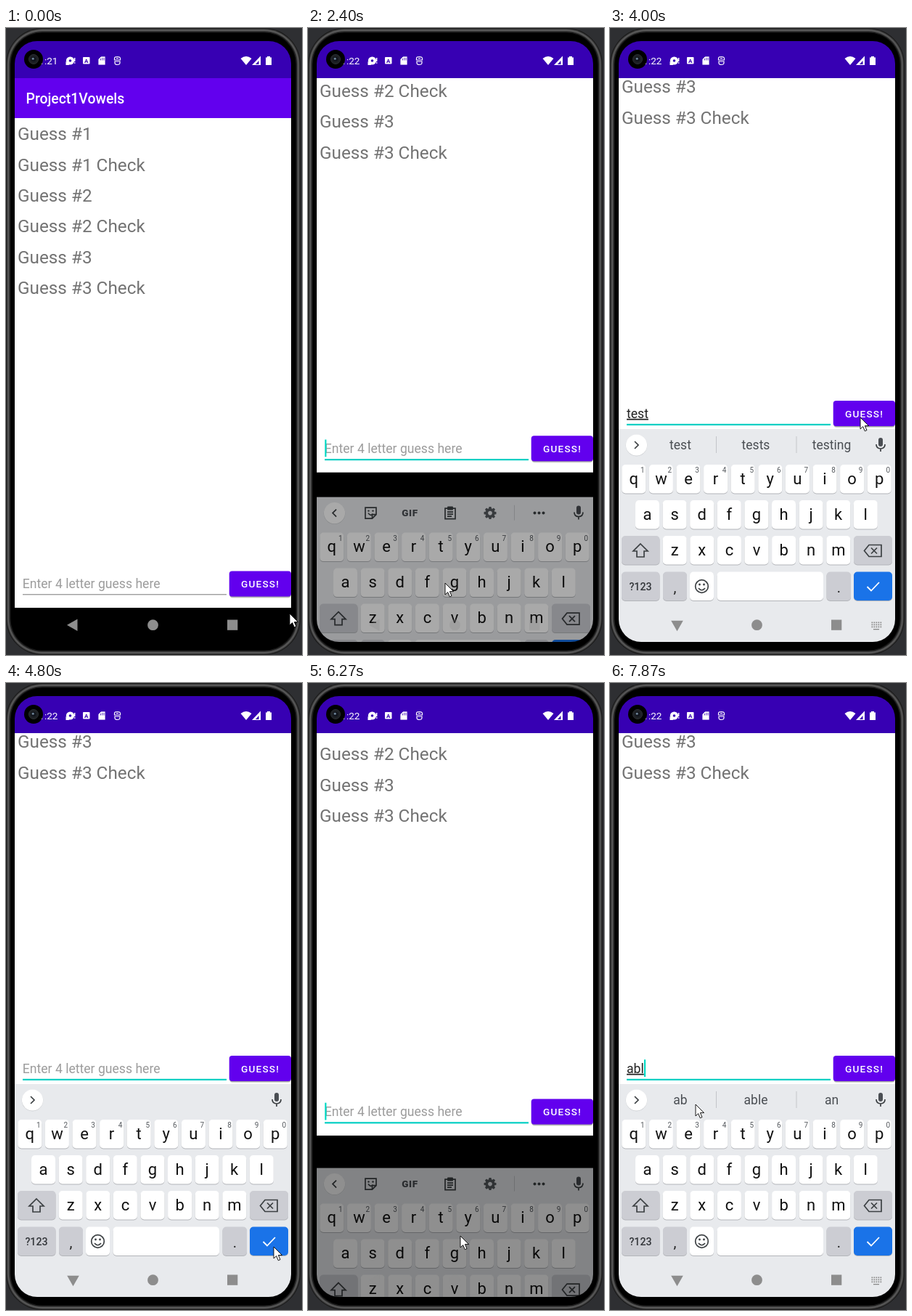
An HTML page for the animation above (8000 ms loop, 408 by 863 pixels).

```html
<!DOCTYPE html>
<html lang="en">
<head>
<meta charset="utf-8">
<title>Word guess app</title>
<style>
html, body { margin: 0; width: 100%; height: 100%; overflow: hidden; background: #17181a; }
svg { display: block; font-family: Roboto, sans-serif; }
text { white-space: pre; }
.mid { text-anchor: middle; }
.end { text-anchor: end; }
.line { fill: none; stroke: #3c4043; stroke-width: 1.7; }
</style>
</head>
<body>
<svg id="stage" width="408" height="863" viewBox="0 0 408 863"></svg>
<script>
const LOOP = 8000, PAN = 234.5, KEYBOARD = 293;
const stage = document.getElementById('stage');

const rect = (x, y, w, h, fill, r = 0, extra = '') =>
  `<rect x="${x}" y="${y}" width="${w}" height="${h}" rx="${r}" fill="${fill}" ${extra}/>`;
const circle = (x, y, r, fill, extra = '') => `<circle cx="${x}" cy="${y}" r="${r}" fill="${fill}" ${extra}/>`;
const text = (x, y, size, fill, body, extra = '') =>
  `<text x="${x}" y="${y}" font-size="${size}" fill="${fill}" ${extra}>${body}</text>`;
const path = (d, extra = 'fill="#3c4043"') => `<path d="${d}" ${extra}/>`;
const at = (x, y, body) => `<g transform="translate(${x} ${y})">${body}</g>`;
const LINE = 'class="line"';

// Nested rounded shells give the rim its soft highlight
function device() {
  const shells = ['#1b1b1b', '#444', '#5c5c5c', '#3a3a3a', '#171717', '#000'];
  return rect(0, 0, 408, 863, '#2e2f32') + shells.map((fill, i) => {
    const inset = i * 1.3;
    return rect(inset, inset, 406 - 2 * inset, 863 - 2 * inset, fill, 50 - inset);
  }).join('');
}

function statusBar() {
  const gear = circle(0, 0, 5.6, '#fff') + circle(0, 0, 1.8, '#3700b3') +
    path('M-6 6V1L-1 6Z', 'fill="#fff"') + rect(5.5, -4, 1.4, 5, '#fff') + rect(5.5, 2.2, 1.4, 1.6, '#fff');
  const bug = path('M-4 -1V-3Q-4 -5.5 0 -5.5T4 -3V-1ZM-3.5 1H3.5V3Q3.5 5.5 0 5.5T-3.5 3Z',
    'fill="none" stroke="#fff" stroke-width="1.2"') + rect(-1.5, -4, 3, 1.2, '#fff');
  return rect(12, 18, 381, 51, '#3700b3') +
    text(71.5, 50, 13.6, '#fff', '', 'id="clock" class="end"') +
    at(88.5, 45, gear) +
    rect(106, 40, 9.5, 9.5, '#fff', 1) + text(110.7, 48, 8, '#3700b3', 'A', 'class="mid" font-weight="700"') +
    path('M131 39H137V51H127V43ZM130.5 42V44.5M132.8 41V44.5M135 41V44.5',
      'fill="#fff" stroke="#3700b3" stroke-width=".8"') +
    at(153.5, 45, bug) +
    path('M323.5 42Q331 36 338.5 42L331 51Z', 'fill="#fff"') +
    path('M351 38.5V51H339Z', 'fill="#fff"') + path('M348.5 45V50H344Z', 'fill="#3700b3"') +
    path('M358 40.5H360V39H364V40.5H366V51H358Z', 'fill="#fff"') +
    circle(38, 43, 13, '#000') + circle(38, 43, 6.5, '#1d2024', 'stroke="#2c3034"') +
    circle(38, 43, 3.2, '#10141c') + circle(37.2, 42.2, 1.5, '#71879b');
}

function app() {
  const rows = [1, 2, 3].flatMap(n => [`Guess #${n}`, `Guess #${n} Check`]);
  const rowY = i => 154.2 + i * 42.4;
  return rect(12, 69, 381, 729, '#fff') +
    rect(12, 69, 381, 55, '#6200ee') +
    text(27.5, 104.3, 19.4, '#fff', 'Project1Vowels', 'font-weight="500"') +
    rows.map((row, i) => text(16, rowY(i), 24.3, '#737373', row)).join('') +
    `<g id="answer">${['TEST', 'XXXX'].map((word, i) =>
      text(388.5, rowY(i), 24.3, '#737373', word, 'class="end"')).join('')}</g>` +
    text(22.8, 771.3, 17.6, '#9c9c9c', 'Enter 4 letter guess here', 'id="hint"') +
    text(23, 771.3, 17.6, '#212121', '', 'id="typed"') +
    rect(23, 779.3, 281, 1, '#777', 0, 'id="underline"') +
    rect(23.2, 752.8, 2.2, 23.8, '#03dac5', 0, 'id="caret"') +
    rect(308.5, 749.5, 84, 35, '#000', 4, 'opacity=".18"') +
    rect(308, 748.5, 85, 35, '#000', 4, 'opacity=".22"') +
    rect(307.7, 747.5, 85.3, 35, '#6200ee', 4) +
    rect(307.7, 747.5, 85.3, 35, '#fff', 4, 'id="ripple"') +
    text(324, 770.4, 13.6, '#fff', 'GUESS!', 'font-weight="500" letter-spacing="1.21"');
}

function key(x, y, w, fill, body = '') {
  return rect(x, y + 1, w, 39.5, '#b3b5b9', 5) + rect(x, y, w, 39.5, fill, 5) + body;
}

function letters(word, left, y, digits) {
  return [...word].map((letter, i) => {
    const x = left + i * 37.6;
    return key(x, y, 33, '#fff', text(x + 16.5, y + 26.5, 22, '#111', letter, 'class="mid"') +
      (digits ? text(x + 28.5, y + 11, 10, '#55595e', (i + 1) % 10, 'class="mid"') : ''));
  }).join('');
}

function toolIcons() {
  const teeth = Array.from({ length: 8 }, (_, i) =>
    rect(-1.8, -8.5, 3.6, 4, '#55595e', 1, `transform="rotate(${i * 45})"`)).join('');
  return at(86.5, 574, path('M-7.5 -7.5H7.5V2L2 7.5H-7.5ZM7.5 2H2V7.5M-3.5 0Q0 5 3 1', LINE) +
      circle(-3, -3, 1.2, '#3c4043') + circle(3, -3, 1.2, '#3c4043')) +
    text(140.5, 578.6, 13.5, '#4a4e53', 'GIF', 'class="mid" font-weight="900" letter-spacing=".6"') +
    at(196, 574, path('M-7 -6.5H7V8H-7ZM-4 -1.5H4M-4 1.5H4M-4 4.5H2', LINE) + rect(-4, -9, 8, 5, '#3c4043', 1)) +
    at(251, 574, teeth + circle(0, 0, 4.7, 'none', 'stroke="#55595e" stroke-width="3.6"')) +
    rect(284, 563, 1, 21, '#c6c8cc') +
    [312.5, 318.5, 324.5].map(x => circle(x, 574, 2, '#3c4043')).join('');
}

function keyboard() {
  const shift = path('M42 710L52 720H47V728H37V720H32Z', LINE);
  const erase = path('M357 711.5H374V727.5H357L350.5 719.5ZM360 715.5L368 723.5M368 715.5L360 723.5', LINE);
  const smile = circle(126.5, 768.5, 8.8, 'none', LINE) + circle(123.5, 766, 1.4, '#3c4043') +
    circle(129.5, 766, 1.4, '#3c4043') + path('M122 771Q126.5 776.5 131 771', LINE);
  const grey = '#cccdd3';
  return rect(12, 552, 381, 400, '#e8eaed') +
    circle(36.5, 574.6, 14.8, '#cfd1d4') + circle(36.5, 574, 14.6, '#fff') +
    path('M2.5 -5L-2.5 0L2.5 5', `id="chevron" ${LINE}`) +
    `<g id="tools">${toolIcons()}</g>` +
    `<g id="words">${[97, 201, 305.5].map(x => text(x, 580.4, 17.5, '#4a4e53', '', 'class="mid"')).join('')}` +
    rect(146, 562, 1, 23, '#c3c5c9') + rect(256.5, 562, 1, 23, '#c3c5c9') + '</g>' +
    at(373, 573, rect(-3, -9, 6, 12, '#4a4e53', 3) + path('M-6 0Q-6 6 0 6T6 0M0 6V10', LINE)) +
    letters('qwertyuiop', 16.3, 601, true) +
    letters('asdfghjkl', 35, 650) +
    letters('zxcvbnm', 72.7, 699) +
    key(16, 699, 52.5, grey, shift) + key(336, 699, 53, grey, erase) +
    key(16, 748.5, 52.5, grey, text(42, 774, 14.2, '#33363a', '?123', 'class="mid" font-weight="500"')) +
    key(73, 748.5, 33, grey, text(89.5, 777, 20, '#222', ',', 'class="mid"')) +
    key(110, 748.5, 33, '#fff', smile) +
    key(147.5, 748.5, 146.5, '#fff') +
    key(298.5, 748.5, 33.5, grey, text(315.5, 777, 20, '#222', '.', 'class="mid"')) +
    key(336, 748.5, 53, '#1a73e8', path('M354.5 769L360 774.5L371 763', 'fill="none" stroke="#fff" stroke-width="1.8"'));
}

function navBar() {
  const dots = Array.from({ length: 15 }, (_, i) =>
    rect(360.5 + i % 5 * 3, 817.5 + Math.floor(i / 5) * 3, 1.7, 1.7, '#888')).join('');
  return '<g id="nav" fill="#8d8d8d">' + path('M-8.5 0L6 -8.3V8.3Z', 'id="back"') +
    circle(202.5, 821.7, 7.4, 'inherit') + rect(305, 814.5, 14.3, 14.3, 'inherit') + '</g>' +
    `<g id="switcher">${dots}${rect(363, 827, 8, 1.3, '#888')}</g>`;
}

stage.innerHTML = `<defs>
  <clipPath id="screen"><rect x="12" y="18" width="381" height="827" rx="31"/></clipPath>
  <clipPath id="window"><rect x="12" y="69" width="381" height="729"/></clipPath></defs>` +
  device() +
  `<g clip-path="url(#screen)"><g clip-path="url(#window)"><g id="app">${app()}</g></g>
   <g id="keyboard">${keyboard()}</g>${navBar()}${statusBar()}</g>` +
  path('M0 0V16L3.7 12.6L6.3 18.8L9 17.6L6.4 11.6H11.6Z', 'id="pointer" fill="#fff" stroke="#000" stroke-width=".9"');

const el = {};
stage.querySelectorAll('[id]').forEach(node => el[node.id] = node);
const suggestions = el.words.querySelectorAll('text');

// time, typed text, suggestions (null shows the tool icons)
const typing = [
  [0, '', null], [3000, 't', null], [3070, 't', ['t', 'the', 'to']], [3130, 'te', ['te', 'the', 'ten']],
  [3270, 'tes', ['tes', 'test', 'yes']], [3400, 'test', ['test', 'tests', 'testing']],
  [4270, '', []], [5120, '', null],
  [7670, 'a', null], [7730, 'a', ['a', 'an', 'and']], [7800, 'ab', ['ab', 'able', 'an']],
  [7870, 'abl', ['ab', 'able', 'an']],
];
const caretOn = [[2130, 2630], [3000, 3930], [4270, 4730], [4970, 5470], [5970, 6470], [6970, 7470], [7670, 8100]];
const pointer = [
  [270, 391, 806], [1070, 305, 846], [1130, 305, 846], [1740, 184, 766], [1800, 189, 764],
  [2530, 189, 764], [2930, 331, 546], [3000, 331, 546], [3200, 345, 536], [4330, 345, 536],
  [4660, 366, 790], [4730, 369, 776], [5200, 369, 776], [5270, 306, 759], [5600, 285, 808],
  [5950, 210, 761], [6450, 210, 761], [6900, 108, 595], [7130, 108, 595], [7195, 118, 580], [LOOP, 118, 580],
];

const ramp = (t, start, length) => Math.min(1, Math.max(0, (t - start) / length));
const smooth = u => u * u * (3 - 2 * u);
const decelerate = u => 1 - (1 - u) ** 3;
const show = (node, on) => node.setAttribute('visibility', on ? 'inherit' : 'hidden');
const move = (node, x, y, more = '') => node.setAttribute('transform', `translate(${x} ${y}) ${more}`);

// Cubic bezier easing (.2, 0, 0, 1), solved by bisection
function emphasized(x) {
  let low = 0, high = 1;
  for (let i = 0; i < 20; i++) {
    const s = (low + high) / 2;
    if (.6 * (1 - s) ** 2 * s + s ** 3 < x) low = s; else high = s;
  }
  return smooth(low);
}

function pointerAt(t) {
  const i = pointer.findIndex(p => p[0] > t);
  if (i <= 0) return pointer[i ? pointer.length - 1 : 0].slice(1);
  const [from, to] = [pointer[i - 1], pointer[i]];
  const u = smooth(ramp(t, from[0], to[0] - from[0]));
  return [1, 2].map(k => from[k] + (to[k] - from[k]) * u);
}

function render(t) {
  const opening = t < 4840 ? 2317 : 6200;
  const closing = t >= 4840 && t < 6000;
  const raw = closing ? 1 - ramp(t, 4840, 220) : ramp(t, opening, 285);
  const rise = closing ? 1 - emphasized(1 - raw) : emphasized(raw);
  const pan = closing ? 1 - decelerate(ramp(t, 4840, 230)) : decelerate(ramp(t, opening - 41, 305));
  const turn = closing ? 1 - ramp(t, 4870, 180) : smooth(ramp(t, opening + 100, 190));

  move(el.app, 0, -PAN * pan);
  move(el.keyboard, 0, KEYBOARD * (1 - rise));
  el.keyboard.setAttribute('opacity', Math.min(1, raw * 2.25));
  move(el.back, 92.5, 821.7, `rotate(${-90 * turn})`);
  // Buttons dim while the bar switches from dark to light
  el.nav.setAttribute('opacity', 1 - .7 * Math.sin(Math.PI * Math.min(1, raw * 1.6)));
  show(el.switcher, raw > .5 && !(t > 4797 && t < 6000));

  const [, word, strip] = typing.findLast(step => step[0] <= t + 3);
  el.typed.textContent = word;
  el.typed.setAttribute('text-decoration', strip ? 'underline' : 'none');
  show(el.hint, !word);
  show(el.tools, !strip);
  show(el.words, strip && strip.length);
  suggestions.forEach((node, i) => node.textContent = strip && strip[i] || '');
  move(el.chevron, 36.5, 574, strip ? 'scale(-1 1)' : '');

  const focused = t >= 2130;
  el.underline.setAttribute('fill', focused ? '#03cfc4' : '#777');
  el.underline.setAttribute('height', focused ? 2.2 : 1);
  show(el.caret, caretOn.some(([on, off]) => t + 3 >= on && t + 3 < off));
  move(el.caret, word ? el.typed.getComputedTextLength() : 0, 0);

  show(el.answer, t >= 4270);
  el.ripple.setAttribute('opacity', .24 * ramp(t, 4150, 120) * (1 - ramp(t, 4330, 300)));
  el.clock.textContent = t < 640 ? '1:21' : '1:22';
  move(el.pointer, ...pointerAt(t));
}

const start = performance.now();
function tick() {
  render((performance.now() - start) % LOOP);
  requestAnimationFrame(tick);
}
tick();
</script>
</body>
</html>
```
